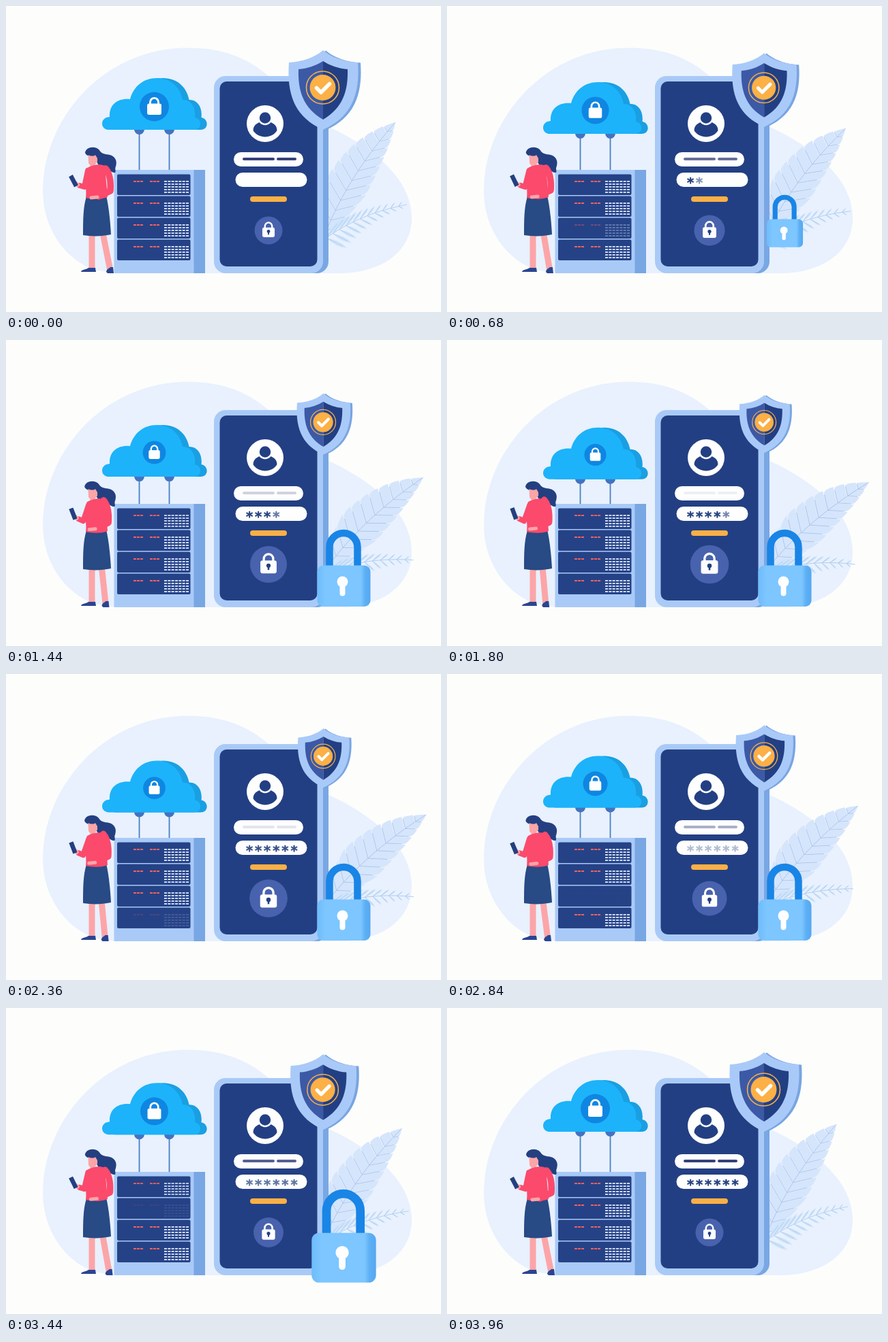
Write an HTML page that moves like this. It is 638x450 px and loops after 4 s.

```html
<!DOCTYPE html>
<html lang="en">
<head>
<meta charset="utf-8">
<title>Cloud security</title>
<style>
html, body { margin: 0; width: 100%; height: 100%; overflow: hidden; background: #fdfdfc; }
svg { display: block; width: 100%; height: 100%; }
.stars { font: bold 19.5px "DejaVu Sans", sans-serif; text-anchor: middle; fill: #24407f; stroke: #24407f; stroke-width: .5; }
</style>
</head>
<body>
<svg viewBox="0 0 638 450">
  <defs>
    <linearGradient id="lockFill">
      <stop offset="0" stop-color="#6dbcfb"/><stop offset=".15" stop-color="#7dc6ff"/>
      <stop offset=".82" stop-color="#7dc6ff"/><stop offset=".9" stop-color="#5db0f5"/><stop offset="1" stop-color="#55a8f0"/>
    </linearGradient>
    <path id="cloudShape" d="M151 182C138 182 137 164 152 163C151 144 165 135 182 137C187 118 202 106 221 106C243 106 256 121 259 138C270 137 279 148 277 164C288 166 288 182 276 182Z"/>
    <path id="shieldShape" d="M465 65C452 76 435 82 415 83C412 125 420 162 465 182C510 162 519 125 516 83C496 82 478 76 465 65Z"/>
    <g id="padlock">
      <path d="M-5.500-3V-6A5.500 5.500 0 0 1 5.500-6V-3" fill="none" stroke="#fefefe" stroke-width="2.600"/>
      <rect x="-9.500" y="-4" width="19" height="15" rx="2.500" fill="#fefefe"/>
    </g>
  </defs>

  <path fill="#e8f1fd" d="M130 388C85 372 54 325 54 272C55 163 145 62 265 61.500C345 61 385 97 420 140C445 165 460 172 480 181C530 205 595 250 595 312C595 365 545 393 490 393H160Z"/>

  <g id="leaves"><g id="bigLeaf"></g><g id="fern"></g></g>

  <!-- phone -->
  <rect x="313" y="103" width="160" height="290" rx="17" fill="#79a7e3"/>
  <rect x="305" y="103" width="160" height="290" rx="17" fill="#a9caf7"/>
  <rect x="313.500" y="111" width="143" height="272" rx="10" fill="#233f83"/>
  <circle cx="380" cy="173" r="27" fill="#fefefe"/>
  <path d="M362.500 183C362.500 165 397.500 165 397.500 183C394 189 387 192.500 380 192.500S366 189 362.500 183Z" fill="#233f83"/>
  <circle cx="380" cy="164.500" r="9.500" fill="#233f83" stroke="#fefefe" stroke-width="2.500"/>
  <rect x="334" y="215" width="102" height="21" rx="10.500" fill="#fefefe"/>
  <path id="nameLines" d="M349 225H392M399 225H424" stroke="#35407c" stroke-width="4" stroke-linecap="round"/>
  <rect x="336.500" y="245" width="105" height="21" rx="10.500" fill="#fefefe"/>
  <g id="stars" class="stars"></g>
  <rect x="358" y="280" width="54" height="8" rx="4" fill="#fcb045"/>
  <g id="badge">
    <circle r="20.500" fill="#4862ae"/>
    <g transform="translate(0 -.5) scale(.95)">
      <use href="#padlock"/>
      <path d="M0 2V7" stroke="#233f83" stroke-width="2"/><circle cy="2" r="2.500" fill="#233f83"/>
    </g>
  </g>

  <!-- shield -->
  <g id="shield">
    <use href="#shieldShape" x="4" y=".5" fill="#79a5e1"/>
    <use href="#shieldShape" fill="#a9caf8"/>
    <path d="M465 81C454 88 442 92 429 93C428 125 436 150 465 167Z" fill="#3c59a6"/>
    <path d="M465 81C476 88 488 92 501 93C502 125 494 150 465 167Z" fill="#233f83"/>
    <g fill="none">
      <circle cx="464.500" cy="120" r="24" stroke="#f5b04a" stroke-width="1.600"/>
      <circle cx="464.500" cy="120" r="19" fill="#fcb045"/>
      <path d="M455.500 120.500L462 127L474.500 114.500" stroke="#fefefe" stroke-width="5.500" stroke-linecap="round" stroke-linejoin="round"/>
    </g>
  </g>

  <!-- cloud -->
  <path id="cables" stroke="#4b7fc6" stroke-width="1.800"/>
  <g id="cloud">
    <circle cx="195.500" cy="181.500" r="7.500" fill="#4473c0"/><circle cx="239.500" cy="181.500" r="7.500" fill="#4473c0"/>
    <use href="#cloudShape" x="9.500" fill="#1a9fe2"/>
    <use href="#cloudShape" fill="#1cb3fa"/>
    <g id="cloudBadge"><circle r="21.500" fill="#0f86e2"/><use href="#padlock" transform="scale(1.1)"/></g>
  </g>

  <!-- server -->
  <rect x="275" y="241" width="17" height="152" fill="#79a7e3"/>
  <rect x="158.500" y="241" width="117" height="152" fill="#a9caf7"/>
  <g id="racks"></g>

  <!-- woman -->
  <g id="woman">
    <g fill="none" stroke="#fca5a8">
      <path d="M126 334L126 388" stroke-width="9"/>
      <path id="leg" stroke-width="9"/>
    </g>
    <path d="M110 391C111 387 117 388 121 385H131L132 391Z" fill="#2a4590"/>
    <path id="shoe" d="M147 391C148 386 150 387 153 384H157L158 393H149Z" fill="#2a4590"/>
    <path d="M118 280L147 279C151 296 153 318 154 336C140 339 126 339 113 337C113 315 113 296 118 280Z" fill="#284a85"/>
    <path id="hair" d="M116 216C117 207 131 205 137 212C142 221 152 216 158 222C163 227 162 232 161 236C159 240 162 242 160 245C154 246 149 237 141 236C134 236 133 228 131 221C126 222 119 222 116 216Z" fill="#243f80"/>
    <path d="M127 228V240" stroke="#fca5a8" stroke-width="7"/>
    <path d="M120.500 219C125 221 129 221 131 219L134 224V229C131 235 123 236 121 231Z" fill="#fca5a8"/>
    <path d="M119 238C128 233 138 232 145 235L149 281C138 285 126 284 117 282C119 268 113 252 119 238Z" fill="#fb4a6c"/>
    <g id="farArm" fill="none" stroke-linecap="round" stroke-linejoin="round">
      <path d="M146 239C153 247 154 258 153 272L136 280" stroke="#fb4a6c" stroke-width="9.500"/>
      <path d="M134 281L125 282" stroke="#fca5a8" stroke-width="5"/>
    </g>
    <g id="nearArm" stroke-linecap="round" stroke-linejoin="round" fill="none">
      <path d="M120 242L115 266L108 264" stroke="#fb4a6c" stroke-width="8"/>
      <path d="M105 263L101 260" stroke="#fca5a8" stroke-width="6"/>
      <path d="M96.500 252.500L101.500 262" stroke="#243f80" stroke-width="6.500" stroke-linecap="square"/>
    </g>
  </g>

  <!-- large padlock -->
  <g id="bigLock">
    <path d="M-21 5V-31A20.500 20.500 0 0 1 20 -31V5" fill="none" stroke="#1985e6" stroke-width="10.500"/>
    <rect x="-39" y="-4" width="78" height="60.500" rx="9" fill="url(#lockFill)"/>
    <path d="M-2 20V37" stroke="#fefefe" stroke-width="8" stroke-linecap="round"/>
    <circle cx="-2" cy="20" r="8" fill="#fefefe"/>
  </g>
</svg>
<script>
const LOOP = 4000;
const $ = id => document.getElementById(id);
const set = (id, name, value) => $(id).setAttribute(name, value);
const clamp = x => Math.max(0, Math.min(1, x));
const smooth = x => { x = clamp(x); return x * x * (3 - 2 * x); };
const range = n => [...Array(n).keys()];

function add(parent, tag, attrs) {
  const el = document.createElementNS('http://www.w3.org/2000/svg', tag);
  for (const k in attrs) el.setAttribute(k, attrs[k]);
  return parent.appendChild(el);
}

const quad = (a, b, c) => t => [0, 1].map(i =>
  (1 - t) ** 2 * a[i] + 2 * t * (1 - t) * b[i] + t * t * c[i]);
const along = ([x, y], [dx, dy], len) => [x + dx * len, y + dy * len];

// Leaflet outlines: a broad strip with a rounded end, or a slender oval.
const strip = (a, b, dir, lenA, lenB) =>
  `M${a}L${along(a, dir, lenA * .85)}Q${along(a, dir, lenA * 1.04)} ${along(b, dir, lenB)}L${b}Z`;
const oval = (a, b, dir, len) => {
  const tip = along(a, dir, len);
  return `M${a}Q${along(a, [dir[0] + dir[1] * .3, dir[1] - dir[0] * .3], len * .6)} ${tip}` +
    `Q${along(a, [dir[0] - dir[1] * .3, dir[1] + dir[0] * .3], len * .6)} ${a}Z`;
};

// Leaflets grow on both sides of a curved rib.
function drawLeaf(id, rib, count, dirs, length, leaflet, fill, vein) {
  const g = $(id);
  let veins = '';
  for (const dir of dirs) for (const i of range(count)) {
    const t = i / count, next = (i + .93) / count, a = rib(t);
    add(g, 'path', { d: leaflet(a, rib(next), dir, length(t), length(next)), fill });
    veins += `M${a}L${along(a, dir, length(t) * .8)}`;
  }
  const points = range(21).map(i => rib(i / 20)).join('L');
  add(g, 'path', { d: `M${points}${veins}`, fill: 'none', stroke: vein, 'stroke-width': .8 });
}
drawLeaf('bigLeaf', quad([470, 330], [503, 249], [571, 171]), 11, [[-.5, -.86], [.97, -.24]],
  t => 40 * (1 - t ** 3) * Math.min(1, .45 + 2.2 * t), strip, '#d5e5fb', '#a3bfea');
drawLeaf('fern', quad([470, 341], [520, 305], [588, 292]), 11, [[.6, -.8], [.9, .45]],
  t => 27 * (1 - t) + 6, oval, '#cfe4fb', '#a9c8ef');

const stars = range(6).map(i => {
  const el = add($('stars'), 'text', { x: 357 + i * 13.1, y: 266 });
  el.textContent = '*';
  return el;
});

const lights = range(4).map(row => {
  const y = 247.5 + row * 32, g = $('racks');
  add(g, 'rect', { x: 163, y, width: 107.5, height: 30.5, rx: 2, fill: '#264286' });
  const group = add(g, 'g', {});
  add(group, 'path', { d: 'M187 0h14M211 0h14', transform: `translate(0 ${y + 10.5})`,
    stroke: '#f4625d', 'stroke-width': 1.8, 'stroke-dasharray': '4 1' });
  add(group, 'path', { d: range(5).map(i => `M232 ${y + 10.5 + i * 4}h36`).join(''),
    stroke: '#cbd8f4', 'stroke-width': 2, 'stroke-dasharray': '4 1.33' });
  return group;
});
// Moments when each rack's lights go dark.
const blinks = [[1230, 3640], [1010, 3420], [600, 2840], [300, 2400]];

function lockPose(t) {
  if (t < 3250) {
    const grow = 1 - (1 - clamp((t - 420) / 600)) ** 2;
    const scale = grow + .03 * Math.sin(Math.PI * clamp((t - 1000) / 300));
    return [scale, -60 * Math.abs(1 - scale)];
  }
  return [t < 3580 ? 1 + .34 * smooth((t - 3250) / 330) : 1.34 * (1 - smooth((t - 3580) / 280)), 0];
}

function draw(t) {
  const p = (1 - Math.cos(2 * Math.PI * t / LOOP)) / 2;
  const drop = 23.3 * p;

  set('cloud', 'transform', `translate(0 ${drop})`);
  set('cloudBadge', 'transform', `translate(217.5 ${148 - 2 * p}) scale(${1 - .26 * p})`);
  set('cables', 'd', `M195.500 ${182 + drop}V241M239.500 ${182 + drop}V241`);
  set('shield', 'transform', `translate(467 123.500) scale(${1 - .28 * p}) translate(-467 -123.500)`);
  set('badge', 'transform', `translate(385 330) scale(${1 + .39 * p})`);
  set('nameLines', 'opacity', 1 - .95 * p);
  set('leaves', 'transform', `rotate(${17.9 * p} 470 345)`);

  const dim = t < 2800 ? smooth((t - 2230) / 570) : 1 - smooth((t - 2800) / 1160);
  stars.forEach((el, i) => el.setAttribute('opacity',
    clamp((t - 220 - 370 * i) / 160) * (1 - .65 * dim)));
  lights.forEach((el, i) => el.setAttribute('opacity',
    Math.min(1, ...blinks[i].map(b => Math.abs(t - b) / 230))));

  set('leg', 'd', `M${142 - 2 * p} 334L${152.5 - 8 * p} 387`);
  set('shoe', 'transform', `translate(${-8 * p} 0)`);
  set('hair', 'transform', `translate(${-p} 0)`);
  set('farArm', 'transform', `translate(${-3.5 * p} ${-4 * p})`);
  set('nearArm', 'transform', `translate(${-2 * p} 0) rotate(${8 * p} 114 266)`);

  const [scale, dy] = lockPose(t);
  set('bigLock', 'transform', `translate(495.500 ${335.5 + dy}) scale(${scale})`);
  set('bigLock', 'visibility', scale > .01 ? 'visible' : 'hidden');
}

function frame() {
  draw(performance.now() % LOOP);
  requestAnimationFrame(frame);
}
frame();
</script>
</body>
</html>
```
